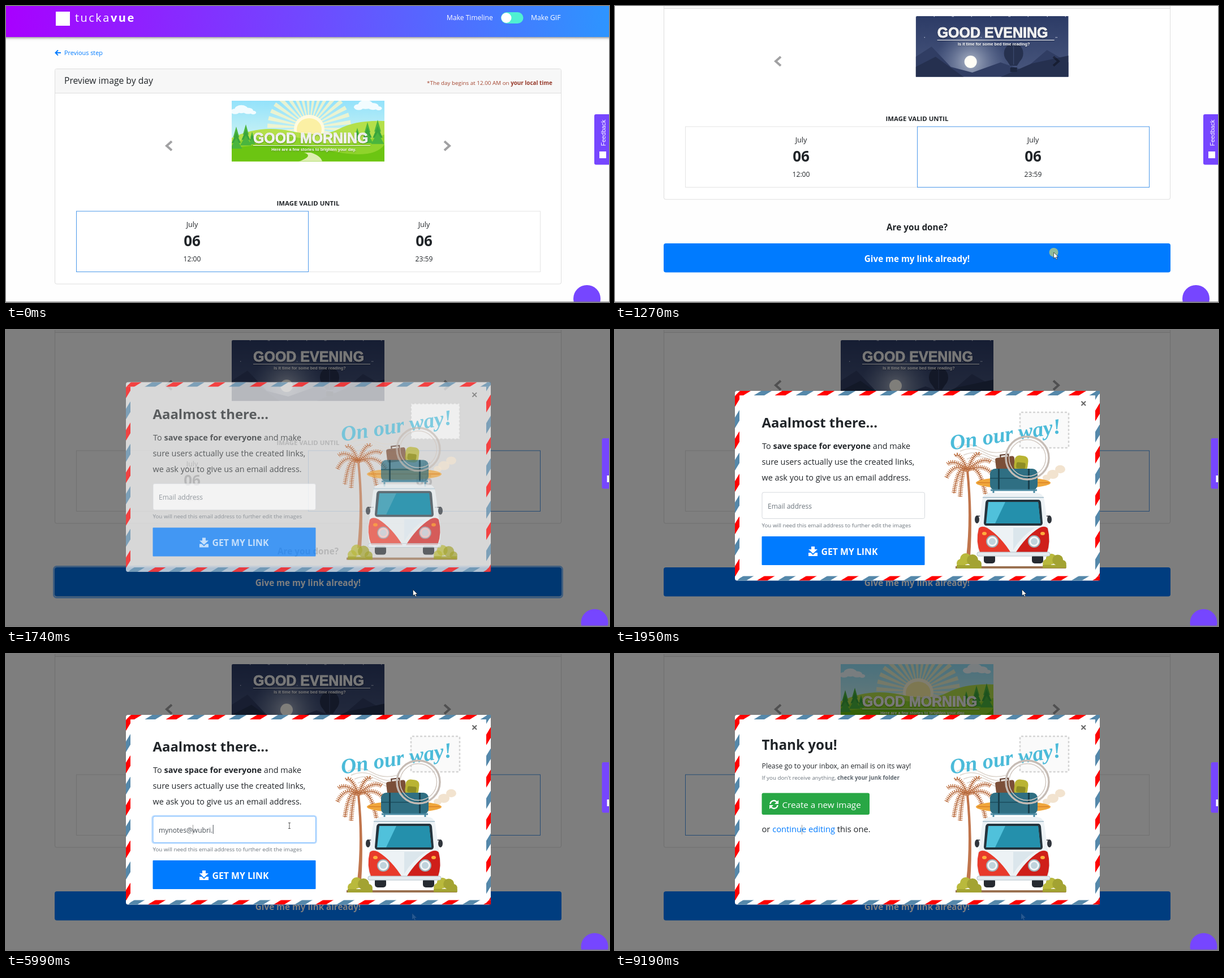
An HTML page with a canvas that plays this animation: 1066 by 525 pixels, repeating every 9330 ms.

```html
<!DOCTYPE html>
<html lang="en">
<head>
<meta charset="utf-8">
<style>
html, body { margin: 0; width: 100%; height: 100%; overflow: hidden; background: #fff; }
canvas { display: block; }
</style>
</head>
<body>
<canvas id="stage" width="1066" height="525"></canvas>
<script>
const ctx = document.getElementById('stage').getContext('2d');
const LOOP = 9330, BLUE = '#007bff', INK = '#212529', PURPLE = '#7646ff', TAU = Math.PI * 2;
const EMAIL = 'mynotes@wubri.com';
const KEYS = [2100, 2240, 3340, 3420, 3570, 4350, 4510, 4900, 5290, 5370, 5520, 5610, 5760, 5990, 6070, 6150, 6300];
const SLIDES = [[930, 1430], [1960, 2240], [5250, 5370], [7276, 7696]];

const linear = (t, a, b) => Math.min(1, Math.max(0, (t - a) / (b - a)));
const smooth = (t, a, b) => { const u = linear(t, a, b); return u * u * (3 - 2 * u); };
const mix = (a, b, u) => a + (b - a) * u;
const sans = (size, weight = 400) => `${weight} ${size}px "Open Sans", sans-serif`;
const arial = (size, weight = 700) => `${weight} ${size}px "Liberation Sans", Arial, sans-serif`;

function group(draw, { x = 0, y = 0, alpha = 1, angle = 0, clip } = {}) {
  ctx.save();
  ctx.translate(x, y);
  ctx.rotate(angle);
  ctx.globalAlpha *= alpha;
  if (clip) { ctx.beginPath(); ctx.rect(...clip); ctx.clip(); }
  draw();
  ctx.restore();
}
function rect(x, y, w, h, color) { ctx.fillStyle = color; ctx.fillRect(x, y, w, h); }
function shape(path, fill, stroke, width = 1) {
  if (typeof path === 'string') path = new Path2D(path);
  if (fill) { ctx.fillStyle = fill; ctx.fill(path); }
  if (stroke) { ctx.strokeStyle = stroke; ctx.lineWidth = width; ctx.stroke(path); }
}
function box(x, y, w, h, r, fill, stroke, width) {
  const p = new Path2D(); p.roundRect(x, y, w, h, r); shape(p, fill, stroke, width);
}
function oval(x, y, rx, ry, fill, stroke, width) {
  const p = new Path2D(); p.ellipse(x, y, rx, ry, 0, 0, TAU); shape(p, fill, stroke, width);
}
function text(str, x, y, font, color = INK, align = 'left') {
  ctx.font = font; ctx.fillStyle = color; ctx.textAlign = align;
  ctx.fillText(str, x, y);
  return x + ctx.measureText(str).width;
}
function gradient(x0, y0, x1, y1, ...colors) {
  const g = ctx.createLinearGradient(x0, y0, x1, y1);
  colors.forEach((c, i) => g.addColorStop(i / (colors.length - 1), c));
  return g;
}

function banner(title, subtitle, base, size) {
  ctx.shadowColor = 'rgba(0,0,0,.3)'; ctx.shadowBlur = 2; ctx.shadowOffsetY = 1;
  text(title, 38, base, arial(size), '#fff');
  ctx.strokeStyle = '#fff'; ctx.lineWidth = .8; ctx.strokeText(title, 38, base);
  rect(38, base + 4, 207, 1, '#fff');
  text(subtitle, title.endsWith('MORNING') ? 145 : 138, base + 14, arial(7.3), '#fff', 'center');
}
function tree(x, y, h) {
  for (let i = 0; i < 3; i++) {
    const w = h * (.13 + .06 * i), top = y + h * .24 * i;
    shape(`M${x} ${top}l${w} ${h * .45}h${-2 * w}z`, i % 2 ? '#3aa53c' : '#4ab53e');
  }
}
function cloud(x, y, s) {
  for (const [dx, dy, r] of [[-14, 3, 6], [-3, -1, 9], [9, 2, 7], [18, 5, 4]]) oval(x + dx * s, y + dy * s, r * s * 1.3, r * s * .8, '#f2fcff');
}
function morning() {
  rect(0, 0, 270, 108, gradient(0, 0, 0, 70, '#93e2fb', '#cdf3f3'));
  cloud(20, 16, 1); cloud(240, 8, 1.1);
  for (let i = 0; i < 34; i++) {
    const a = i * TAU / 34, r = 74;
    shape(`M137 48L${137 + r * Math.cos(a)} ${48 + r * Math.sin(a)}L${137 + r * Math.cos(a + .1)} ${48 + r * Math.sin(a + .1)}Z`, 'rgba(252,247,200,.8)');
  }
  oval(137, 50, 27, 25, '#fffbe0'); oval(137, 51, 22, 20, '#fbf0a4');
  shape('M0 66Q50 42 105 54T190 50T270 36V108H0Z', '#b4e04a');
  shape('M0 74Q80 54 140 70T270 60V108H0Z', '#8fd32c');
  shape('M0 84Q90 70 170 88T270 78V108H0Z', '#6cc512');
  [[8, 46, 42], [25, 42, 40], [36, 55, 24], [222, 48, 24], [240, 38, 40], [258, 34, 46]].forEach(p => tree(...p));
  shape('M128 92Q146 98 118 108H160Q158 98 140 92Z', '#dceeb0');
  banner('GOOD MORNING', 'Here are a few stories to brighten your day.', 75, 24.9);
}
function evening() {
  rect(0, 0, 270, 108, gradient(0, 0, 0, 108, '#2c3b66', '#4a587e'));
  const glow = ctx.createRadialGradient(97, 81, 5, 97, 81, 62);
  glow.addColorStop(0, 'rgba(190,198,212,.75)'); glow.addColorStop(1, 'rgba(120,135,170,0)');
  rect(0, 0, 270, 108, glow);
  for (let i = 0; i < 22; i++) rect(i * 83 % 266, i * 37 % 74, 1.3, 1.3, '#c3cbe0');
  shape('M0 72L28 54L62 90L100 100L150 82L190 96L232 60L270 82V108H0Z', '#303d63');
  shape('M0 90L35 72L85 108H0ZM150 108L205 84L270 70V108Z', '#25304f');
  oval(97, 81, 11, 11, '#fffdf6');
  oval(173, 66, 17, 18, '#26314f');
  shape('M158 74L167 88H179L188 74Z', '#26314f');
  shape('M167 88V92M179 88V92M173 49V86', null, '#414f76');
  rect(167, 91, 12, 8, '#1d2740');
  banner('GOOD EVENING', 'Is it time for some bed time reading?', 38, 25);
}

function dateBox(x, time, selected) {
  ctx.strokeStyle = selected ? '#4a98ea' : '#e4e4e4'; ctx.lineWidth = 1;
  ctx.strokeRect(x + .5, 364, 410, 107.5);
  text('July', x + 205, 392, sans(12.6), INK, 'center');
  text('06', x + 205, 426, sans(26, 700), INK, 'center');
  text(time, x + 205, 453, sans(12.1), INK, 'center');
}
function carousel(t) {
  const shown = SLIDES.filter(s => t >= s[0]).length;
  const progress = shown ? smooth(t, ...SLIDES[shown - 1]) : 1;
  const art = [morning, evening];
  group(() => {
    const place = (draw, offset) => group(draw, { x: 399 + offset * 555, y: 168, clip: [0, 0, 270, 107.5] });
    if (progress < 1) place(art[1 - shown % 2], -progress);
    place(art[shown % 2], 1 - progress);
  }, { clip: [257, 160, 555, 130] });
  shape('M293 240L284 248L293 256', null, t > 600 && t < 1000 ? '#40302f' : 'rgba(0,0,5,.37)', 4);
  shape('M775 240L784 248L775 256', null, 'rgba(0,0,5,.37)', 4);
  const right = shown % 2;
  dateBox(right ? 124 : 534, right ? '12:00' : '23:59', false);
  dateBox(right ? 534 : 124, right ? '23:59' : '12:00', true);
}
function page(t) {
  group(() => {
    ctx.shadowColor = 'rgba(0,0,0,.55)'; ctx.shadowBlur = 5; ctx.shadowOffsetY = 1;
    rect(-5, -20, 1076, 75, gradient(0, 55, 1066, 0, '#a800ff', '#7049ff', '#2d95ff'));
  });
  rect(88, 10, 25, 25, '#fff');
  group(() => {
    ctx.letterSpacing = '2.5px';
    text('vue', text('tucka', 122, 28, sans(20), '#fff'), 28, sans(20, 700), '#fff');
  });
  text('Make Timeline', 779, 25, sans(12.1), '#fff');
  box(875, 11, 39.5, 20, 10, '#4ff0d2');
  oval(884.5, 21, 9, 9, '#fff');
  text('Make GIF', 928, 25, sans(12.2), '#fff');
  shape('M97 83H88M92 78.5L87.5 83L92 87.5', null, BLUE, 2);
  text('Previous step', 103, 87, sans(10.9), BLUE);

  box(86.5, 111.5, 895, 381.5, 3, '#fff', '#dedede');
  box(87, 112, 894, 42, [3, 3, 0, 0], '#f7f7f7');
  rect(87, 154, 894, 1, '#dedede');
  text('Preview image by day', 103, 138, sans(15.7, 500));
  const x = text('*The day begins at 12.00 AM on ', 744, 140, sans(9.85), '#a4452f');
  text('your local time', x, 140, sans(9.85, 700), '#96392a');
  text('IMAGE VALID UNTIL', 534, 354, sans(11.4, 700), INK, 'center');
  carousel(t);

  text('Are you done?', 534, 548, sans(15.3, 700), INK, 'center');
  const focused = t > 1430 && t < 1880;
  if (focused) box(84.5, 569.5, 899, 55, 5, null, 'rgba(0,123,255,.5)', 3);
  box(86, 571, 896, 51.5, 4, focused ? '#006fe4' : BLUE);
  text('Give me my link already!', 534, 604, sans(15.2, 700), '#fff', 'center');
}
function widgets(t) {
  const x = t > 1500 ? 13.5 : 0;
  box(1040 + x, 192, 40, 89.5, 3, PURPLE);
  group(() => text('Feedback', 0, 0, arial(10.6, 400), '#fff', 'center'), { x: 1060 + x, y: 225, angle: -TAU / 4 });
  rect(1049 + x, 258, 12, 12, '#fff');
  oval(1027 + x, 519, 24, 24, PURPLE);
  rect(0, 524, 1066, 1, 'rgba(120,120,120,.7)');
}

// Diagonal stripes on an 800 x 417 sheet; its 16 px rim is squeezed into the card's 8 px border.
function airmailBorder() {
  const columns = [[212, 0], [220, 16], [849, 784], [857, 800]];
  const rows = [[108, 0], [116, 16], [436.5, 401], [444.5, 417]];
  const band = 16 * Math.SQRT2;
  for (let r = 0; r < 3; r++) for (let c = 0; c < 3; c++) {
    if (r === 1 && c === 1) continue;
    const [[x, sx], [x2, sx2]] = columns.slice(c), [[y, sy], [y2, sy2]] = rows.slice(r);
    group(() => {
      ctx.translate(x, y);
      ctx.scale((x2 - x) / (sx2 - sx), (y2 - y) / (sy2 - sy));
      ctx.translate(-sx, -sy);
      for (let s = 1217, i = 0; s > 0; s -= 2 * band, i++) {
        shape(`M${s} 0h${-band}l-417 417h${band}z`, i % 2 ? '#5588aa' : '#f00');
      }
    }, { clip: [x, y, x2 - x, y2 - y] });
  }
}
function palm() {
  shape('M621 402Q629 330 621 250L625 249Q633 330 628 402Z', '#c0754c');
  const tips = [[586, 262], [588, 238], [601, 224], [645, 222], [664, 234], [672, 262], [655, 292], [599, 290], [610, 296]];
  for (const [x, y] of tips) {
    const d = `M623 248Q${mix(623, x, .65)} ${Math.min(y, 244) - 10} ${x} ${y}`;
    ctx.setLineDash([1.4, 1.8]); shape(d, null, '#c47a4c', 8);
    ctx.setLineDash([]); shape(d, null, '#b0653c', 1.3);
  }
}
function bush(x, y, s) {
  for (const [dx, dy, r] of [[-14, 5, 8], [-6, -3, 10], [6, -1, 10], [15, 6, 7]]) oval(x + dx * s, y + dy * s, r * s, r * s, dx < 0 ? '#b9b93c' : '#a3a332');
  rect(x - 22 * s, y + 8 * s, 44 * s, 6 * s, '#a3a332');
}
function van() {
  oval(704, 271, 66, 10, '#f0a63b');
  rect(641, 270, 126, 1.5, '#d98128');
  group(() => {
    box(-17, -12, 34, 24, 4, '#7b4f38');
    shape('M-7 -12V-16H7V-12', null, '#5a3728', 2);
  }, { x: 690, y: 237, angle: -.12 });
  group(() => {
    box(-12, -13, 24, 27, 8, '#b9b433');
    box(-8, -1, 16, 11, 3, '#8e8d25');
  }, { x: 718, y: 236, angle: .12 });
  box(663, 246, 84, 38, 9, '#2f6f83');
  rect(663, 262, 84, 2, '#1f5566');
  rect(677, 246, 3, 38, '#183f4d'); rect(730, 246, 3, 38, '#183f4d');
  shape('M664 284H746M669 284V293M741 284V293', null, '#4c8ba3', 3);
  shape('M650 330H640M758 330H768', null, '#30353c', 1.5);
  oval(640, 336, 4, 7, '#30353c'); oval(768, 336, 4, 7, '#30353c');
  box(652, 398, 20, 16, 5, '#262a30'); box(737, 398, 20, 16, 5, '#262a30');
  shape('M649 302Q651 289 664 289H744Q757 289 759 302L765 346Q772 380 764 400H645Q636 380 643 346Z', '#edf2f5');
  shape('M650 297H758', null, '#b4c9d4', 2);
  shape('M660 301H748Q752 301 753 306L756 342Q756 347 751 347H657Q652 347 652 342L655 306Q656 301 660 301Z', '#24343d');
  shape('M660 305H748L752 343H656Z', '#50c1db');
  shape('M690 305H748L752 343H672Z', '#2490ac');
  shape('M643 352Q648 346 658 351Q682 366 701 397H646Q637 375 643 352Z', '#e83a2b');
  shape('M765 352Q760 346 750 351Q726 366 707 397H763Q771 375 765 352Z', '#cf1f1a');
  shape('M704 351H742Q718 366 704 390Z', '#dbe6ec');
  for (const x of [667, 741]) { oval(x, 375, 10, 10, '#f4f6f7', '#9eb0b8', 2); oval(x, 375, 6, 6, '#bfd3dc'); }
  oval(653, 361, 4, 3, '#ffad3d'); oval(756, 361, 4, 3, '#ffad3d');
  box(640, 394, 129, 7, 3, '#e4ebef', '#b6c3ca');
}
function artwork() {
  ctx.setLineDash([4, 3]);
  box(716, 146, 86, 63, 2, '#fafafa', '#d4d4d4', 2.5);
  ctx.setLineDash([]);
  for (let i = 0; i < 4; i++) shape(`M${604 + i * 6} ${208 + i * 7}q22 -10 43 2t44 5`, null, '#ddd5cd', 1.5);
  group(() => text('On our way!', 0, 0, 'italic 700 38px "Liberation Serif", serif', '#4cbbd9'), { x: 594, y: 213, angle: -.155 });
  rect(602, 419, 195, 4, '#9a7150');
  for (const [x, y, r] of [[787, 247, 9], [774, 256, 10], [763, 262, 7]]) oval(x, y, r, r * .8, '#f2e3cf');
  palm();
  bush(626, 409, 1); bush(777, 409, .95);
  van();
  oval(729, 227, 38, 38, null, '#c6bcb5', 3.5);
  oval(729, 227, 32.5, 32.5, null, '#d2c9c2', 1.5);
}
function form(t) {
  text('Aaalmost there...', 259.5, 173, sans(23.9, 700));
  let x = text('To ', 260, 211, sans(14.45));
  x = text('save space for everyone', x, 211, sans(14.45, 700));
  text(' and make', x, 211, sans(14.45));
  text('sure users actually use the created links,', 259.5, 239, sans(14.4));
  text('we ask you to give us an email address.', 259.5, 267, sans(14.4));

  const focused = t >= 2030;
  if (focused) box(258.5, 287, 290, 48.5, 4, null, 'rgba(0,123,255,.25)', 2.6);
  box(260, 288, 287.5, 46.5, 3, '#fff', focused ? '#80bdff' : '#d5d9dd');
  const typed = KEYS.filter(k => t >= k).length;
  if (typed) text(EMAIL.slice(0, typed), 270, 316.5, sans(12.1), '#495057');
  else text('Email address', 270, 316.5, sans(12), '#6c757d');
  const since = t - (KEYS[typed - 1] || 2030);
  if (focused && since < 550) {
    ctx.font = sans(12.1);
    rect(270.5 + ctx.measureText(EMAIL.slice(0, typed)).width, 303, 1, 16, '#495057');
  }
  text('You will need this email address to further edit the images', 259.5, 349.5, sans(9.75), '#6c757d');

  box(259.5, 366, 288, 51, 1, t > 6920 && t < 7750 ? '#0069d9' : BLUE);
  shape('M347 384H353V389H358L350 396.5L342 389H347Z', '#fff');
  shape('M342 395H346L350 399L354 395H358V401H342Z', '#fff');
  text('GET MY LINK', 364.5, 398.5, sans(15.8, 700), '#fff');
}
function thanks() {
  text('Thank you!', 259.5, 170, sans(24.2, 700));
  text('Please go to your inbox, an email is on its way!', 259.5, 203, sans(12.25));
  const x = text("If you don't receive anything, ", 259.5, 222.5, sans(9.8), '#6c757d');
  text('check your junk folder', x, 222.5, sans(9.8, 700), '#5c656d');
  box(259.5, 246.5, 190.5, 38.5, 3, '#28a745');
  shape('M274.5 266A6.5 6.5 0 0 1 286 262.5M287.5 268A6.5 6.5 0 0 1 276 271.5', null, '#fff', 2.4);
  shape('M289 259V266H282ZM273 275V268H280Z', '#fff');
  text('Create a new image', 295.5, 272.5, sans(15.2), '#fff');
  const link = text('continue editing', text('or ', 259.5, 316, sans(14.7)), 316, sans(14.7), BLUE);
  text(' this one.', link, 316, sans(14.7));
}
function modal(t) {
  const shown = smooth(t, 1640, 1800);
  if (!shown) return;
  group(() => {
    box(212, 108, 645, 336.5, 4, '#fff');
    airmailBorder();
    shape('M824.5 126.5L832 134M832 126.5L824.5 134', null, '#666', 2);
    artwork();
    group(() => form(t), { alpha: 1 - smooth(t, 8300, 8650) });
    group(thanks, { alpha: smooth(t, 8700, 9100) });
    if (t > 4900) rect(330, 303, 1, 17, 'rgba(90,90,90,.6)');
  }, { y: -50 * (1 - shown), alpha: shown });
}

function arrow(x, y, alpha = 1) {
  group(() => shape('M0 0V11L2.6 8.6L4.4 12.5L6.2 11.7L4.5 8H8Z', '#fff', '#222', .7), { x, y, alpha });
}
function cursor(t) {
  if (t < 2000) {
    if (t < 600) return;
    const u = smooth(t, 890, 1400), x = mix(1071, 719.5, u), y = mix(313, 460.5, u);
    if (u < 1) oval(x, y, 8, 8, 'rgba(240,230,90,.6)');
    arrow(x, y);
    return;
  }
  arrow(718, 460, .15);
  if (t < 2030 || t > 8300) return;
  const over = smooth(t, 6770, 7050), away = smooth(t, 7650, 7900);
  const x = mix(mix(501, 449, over), 470, away), y = mix(mix(304.5, 388, over), 445, away);
  if (t < 6920) {
    shape(`M${x - 2} ${y - 5}h4m-2 0v10m-2 0h4`, null, '#555');
  } else if (away < 1) {
    group(() => shape('M-2 0Q0 -2 1 0V4L6 5.5Q7.5 6 7 9L6 13H-1L-4 8.5Q-5 6 -2 7.5Z', '#fff', '#222', .8), { x, y });
  } else arrow(x, y);
  if (t >= 7150 && t < 7650) {
    rect(448, 404, 56, 15, 'rgba(0,0,0,.3)');
    rect(446, 402, 56, 15, '#777');
    rect(447, 403, 54, 13, '#fff');
    text('Get my link', 474, 413, sans(9.2), '#575757', 'center');
  }
}

function frame() {
  const t = performance.now() % LOOP;
  rect(0, 0, 1066, 525, '#fefefe');
  group(() => page(t), { y: -150 * smooth(t, 200, 640) });
  rect(0, 0, 1066, 525, `rgba(0,0,0,${.5 * linear(t, 1480, 1660)})`);
  widgets(t);
  modal(t);
  cursor(t);
  requestAnimationFrame(frame);
}
frame();
</script>
</body>
</html>
```
